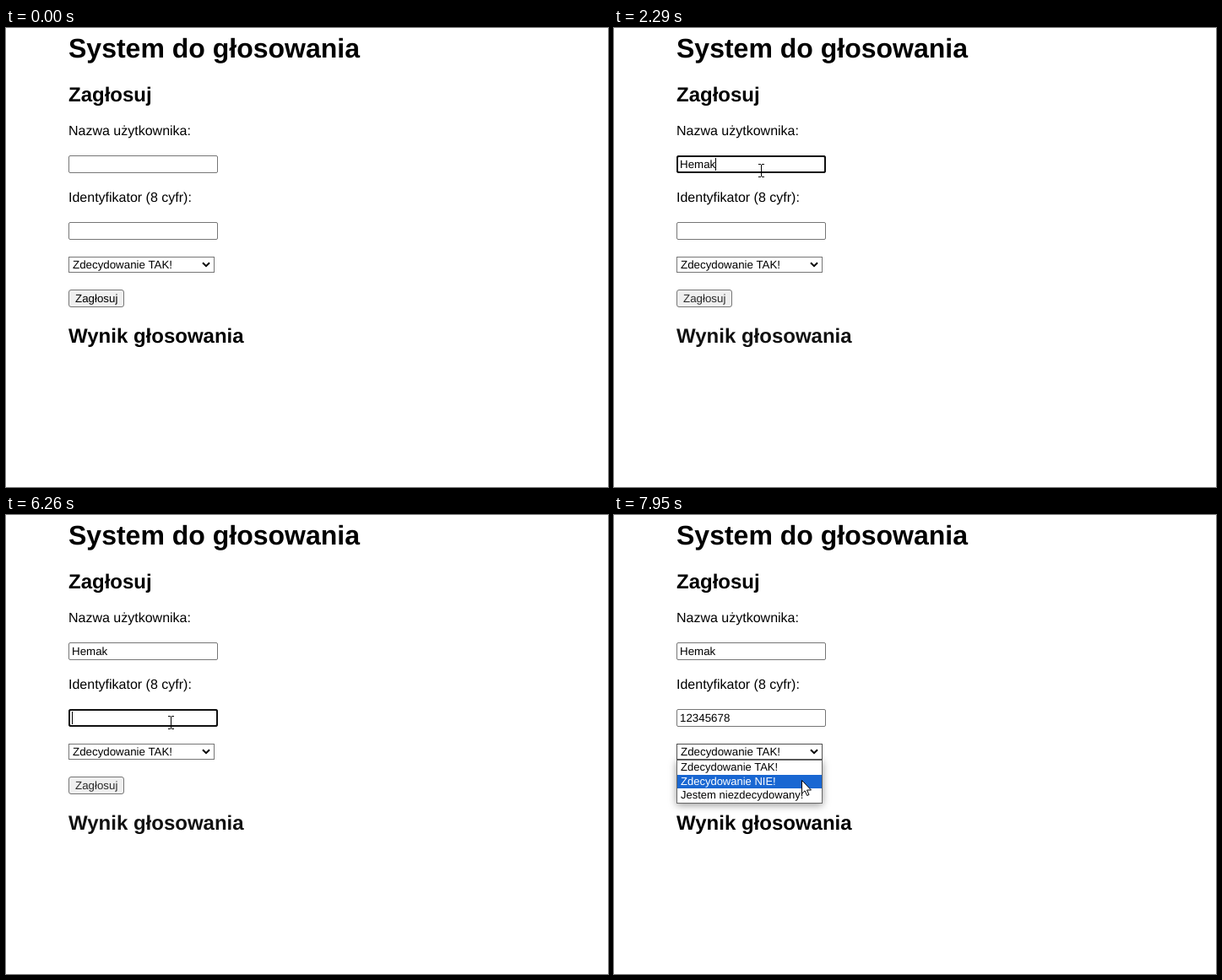
Animation, 713 px wide and 544 px high, one loop 8 s. Source, as an HTML page:

```html
<!DOCTYPE html>
<html lang="pl">
<head>
<meta charset="utf-8">
<title>System do głosowania</title>
<style>
  html, body { margin: 0; width: 100%; height: 100%; overflow: hidden; background: #fff; }
  svg { position: absolute; left: 0; top: 0; }
  text { font: 13.333px "Liberation Sans", Arial, sans-serif; text-rendering: geometricPrecision; white-space: pre; }
  .h1 { font-size: 32px; font-weight: bold; }
  .h2 { font-size: 24px; font-weight: bold; }
  .label { font-size: 16px; }
  .opt { font-size: 13px; }
  .box { fill: #fff; stroke: #767676; }
  .box.hover { stroke: #4f4f4f; }
  .box.pressed { stroke: #8d8d8d; }
  .ring { fill: none; stroke: #101010; stroke-width: 2; }
  .typing #buttonText { fill: #2a2a2a; }
  .typing #result { fill: #111; }
  #button { fill: #efefef; }
  #shadow { position: absolute; left: 74px; top: 290px; width: 173px; height: 52px;
            box-shadow: 0 2px 9px rgba(0, 0, 0, .4); }
</style>
</head>
<body>
<div id="shadow"></div>
<svg id="page" width="713" height="544" viewBox="0 0 713 544">
  <text class="h1" x="74" y="35">System do głosowania</text>
  <text class="h2" x="74" y="87">Zagłosuj</text>
  <g id="form"></g>

  <rect id="select" class="box" x="74.5" y="271.5" width="172" height="18"/>
  <text x="79" y="285">Zdecydowanie TAK!</text>
  <path d="M233 278.2l4 4 4-4" fill="none" stroke="#000" stroke-width="2"/>

  <rect id="button" class="box" x="74.5" y="310.5" width="65" height="20" rx="2.5"/>
  <text id="buttonText" x="82" y="325">Zagłosuj</text>
  <text id="result" class="h2" x="74" y="373">Wynik głosowania</text>

  <g id="menu">
    <rect x="74.5" y="290.5" width="172" height="51" fill="#fff" stroke="#666"/>
    <rect id="mark" x="75" width="171" fill="#1967d2"/>
  </g>

  <rect id="caret" width="1" height="15"/>
  <circle id="click" r="12" fill="#ff0" opacity=".65"/>
  <path id="arrow" d="M.5 .5V16.2L4.1 12.8 6.7 18.5 9 17.5 6.5 12H11.5Z" fill="#fff" stroke="#000"/>
  <path id="beam" d="M-1 -6.5h3M3 -6.5h3M2.5 -6V8M-1 8.5h3M3 8.5h3" fill="none" stroke="#000"/>
</svg>
<script>
const LOOP = 8000, STEP = 69, BLINK = 530;
const OPEN = 7670;

const fields = [
  { label: "Nazwa użytkownika:", value: "Hemak", top: 151, focus: 1760, typed: 2290, blur: 3780 },
  { label: "Identyfikator (8 cyfr):", value: "12345678", top: 230, focus: 6190, typed: 6660, blur: OPEN }
];
const options = ["Zdecydowanie TAK!", "Zdecydowanie NIE!", "Jestem niezdecydowany!"];
const clicks = [...fields.map(f => f.focus), OPEN];

// Pointer stops: leave, arrive, x, y
const stops = [
  [450, 450, 672, 516], [450, 1210, 176, 196], [1210, 1560, 172, 168], [2490, 2560, 194, 168],
  [5430, 5430, 567, 136], [5430, 6190, 193, 245], [7050, 7470, 232, 279], [7740, 7950, 222, 314]
];

const el = id => document.getElementById(id);
const show = (node, on) => { node.style.display = on ? "" : "none"; };
const place = (node, x, y) => node.setAttribute("transform", `translate(${x} ${y})`);
const rowTop = i => 291 + Math.round(i * 50 / 3);

function add(parent, tag, attrs, text = "") {
  const node = document.createElementNS("http://www.w3.org/2000/svg", tag);
  for (const name in attrs) node.setAttribute(name, attrs[name]);
  node.textContent = text;
  return parent.appendChild(node);
}

for (const f of fields) {
  add(el("form"), "text", { class: "label", x: 74, y: f.top - 24 }, f.label);
  f.box = add(el("form"), "rect", { class: "box", x: 74.5, y: f.top + .5, width: 176, height: 20, rx: 1.5 });
  f.ring = add(el("form"), "rect", { class: "ring", x: 75, y: f.top + 1, width: 175, height: 19, rx: 2 });
  f.text = add(el("form"), "text", { x: 78, y: f.top + 15 }, f.value);
  f.width = Math.round(f.text.getComputedTextLength());
}
const rows = options.map((o, i) => add(el("menu"), "text", { class: "opt", x: 79, y: rowTop(i) + 12 }, o));

function pointer(t) {
  if (t < 450 || (t >= 2630 && t < 5430)) return null;
  const i = stops.findLastIndex(s => t >= s[0]);
  const [leave, arrive, ...to] = stops[i];
  const n = Math.round((arrive - leave) / STEP);
  if (!n) return to;
  const p = Math.min(1, Math.floor((t - leave) / STEP) / n);
  const eased = 1 - (1 - p) ** 1.25;
  const from = stops[i - 1].slice(2);
  return to.map((v, k) => Math.round(from[k] + (v - from[k]) * eased));
}

const hit = (p, top, height, width) =>
  !!p && p[0] >= 74 && p[0] < 74 + width && p[1] >= top && p[1] < top + height;

function draw(t) {
  const p = pointer(t);
  let overField = false, focused = null;

  for (const f of fields) {
    const over = hit(p, f.top, 21, 177);
    const active = t >= f.focus && t < f.blur;
    // A label passes its hover on to its field
    f.box.classList.toggle("hover", over || hit(p, f.top - 39, 19, 145));
    show(f.ring, active);
    show(f.text, t >= f.typed);
    overField = overField || over;
    if (active) focused = f;
  }
  el("page").classList.toggle("typing", !!focused);

  let caretOn = false;
  if (focused) {
    const typed = t >= focused.typed;
    caretOn = (t - (typed ? focused.typed : focused.focus)) % (2 * BLINK) < BLINK;
    place(el("caret"), 78 + (typed ? focused.width : 0), focused.top + 3);
  }
  show(el("caret"), caretOn);

  const clicking = clicks.some(c => t >= c && t < c + 70);
  const open = t >= OPEN + 70;
  const row = hit(p, rowTop(1), 16, 173) ? 1 : 0;
  el("select").classList.toggle("hover", open || hit(p, 271, 19, 173));
  el("select").classList.toggle("pressed", t >= OPEN && clicking);
  show(el("shadow"), t >= OPEN);
  show(el("menu"), open);
  el("mark").setAttribute("y", rowTop(row));
  el("mark").setAttribute("height", rowTop(row + 1) - rowTop(row));
  rows.forEach((r, i) => { r.style.fill = i === row ? "#fff" : "#000"; });

  const cursors = { beam: overField, arrow: !overField, click: clicking };
  for (const id in cursors) {
    show(el(id), p && cursors[id]);
    if (p) place(el(id), ...p);
  }
}

const start = performance.now();
function tick() {
  draw((performance.now() - start) % LOOP);
  requestAnimationFrame(tick);
}
tick();
</script>
</body>
</html>
```
